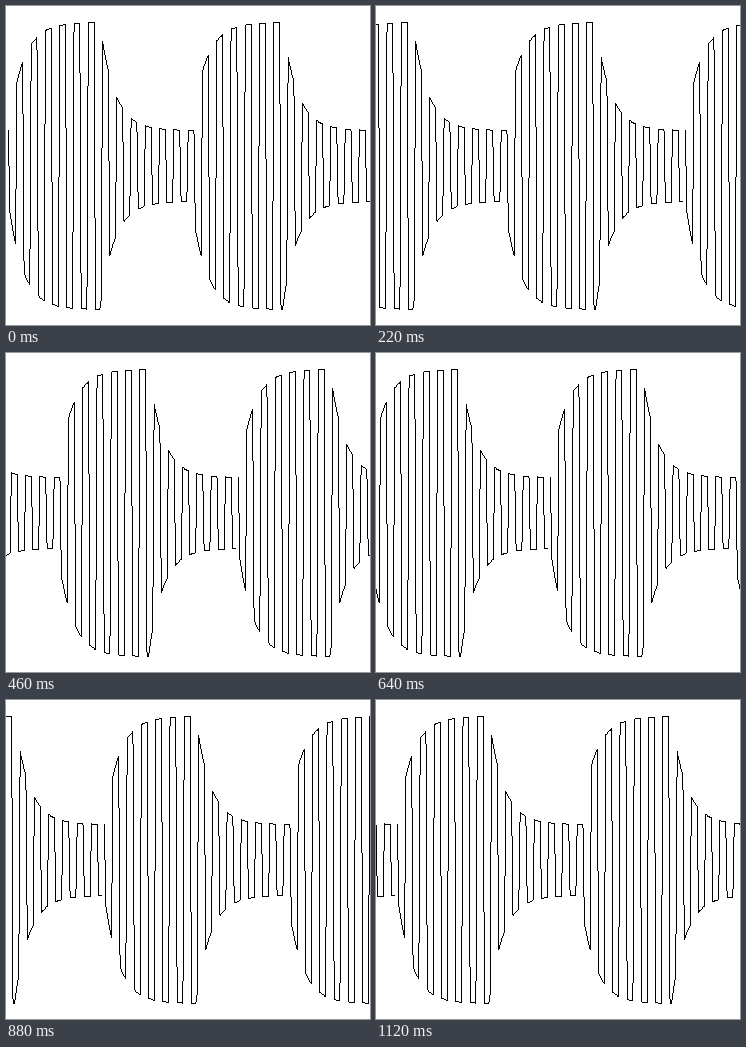
Write a matplotlib script that moves like this. It is 364 by 319 pixels and loops after 1180 ms.

```python
import numpy as np
import matplotlib.pyplot as plt
from matplotlib.animation import FuncAnimation

W, H, DPI = 364, 319, 100
TICK, FRAMES = 20, 59          # ms per frame, frames per loop
STEPS = 19                     # scroll steps per loop
MID, LOW, HIGH = 159.5, 35.5, 143.5
SAMPLES = 255
HALF = 5                       # samples per carrier half-cycle
GATE = 64                      # samples per on/off phase
DECAY = 0.61                   # remaining gap after one half-cycle


def half_cycle(n):
    return -(n // -HALF)


def envelope(n):
    phase = n // GATE
    start = phase * GATE
    rest = (HIGH - LOW) * DECAY ** ((n - start) / HALF)
    if phase % 2:
        return LOW + rest
    if half_cycle(n) == half_cycle(start):
        return LOW             # bursts open on a carrier edge
    return HIGH - rest


def wave():
    n = np.arange(SAMPLES)
    sign = np.where(half_cycle(n) % 2, 1, -1)
    x = 1.88 + n * W / SAMPLES
    y = np.round(MID + sign * [envelope(k) for k in n])
    return x, y


def draw_polyline(x, y):
    img = np.ones((H, W))
    for x0, y0, x1, y1 in zip(x, y, x[1:], y[1:]):
        count = int(max(np.ceil(abs(x1 - x0)), abs(y1 - y0))) + 1
        cols = np.round(np.linspace(x0, x1, count)).astype(int)
        rows = np.round(np.linspace(y0, y1, count)).astype(int)
        seen = cols < W
        img[rows[seen], cols[seen]] = 0
    return img


strip = draw_polyline(*wave())

fig = plt.figure(figsize=(W / DPI, H / DPI), dpi=DPI, facecolor="white")
ax = fig.add_axes([0, 0, 1, 1])
ax.axis("off")
view = ax.imshow(strip, cmap="gray", vmin=0, vmax=1,
                 interpolation="nearest", aspect="auto")


def update(frame):
    t = frame * TICK
    step = 0 if t < 100 else 1 + (t - 100) // 60
    view.set_data(np.roll(strip, -round(step * W / STEPS), axis=1))
    return [view]


anim = FuncAnimation(fig, update, frames=FRAMES, interval=TICK,
                     repeat=True, repeat_delay=0, blit=False)
plt.show()
```
